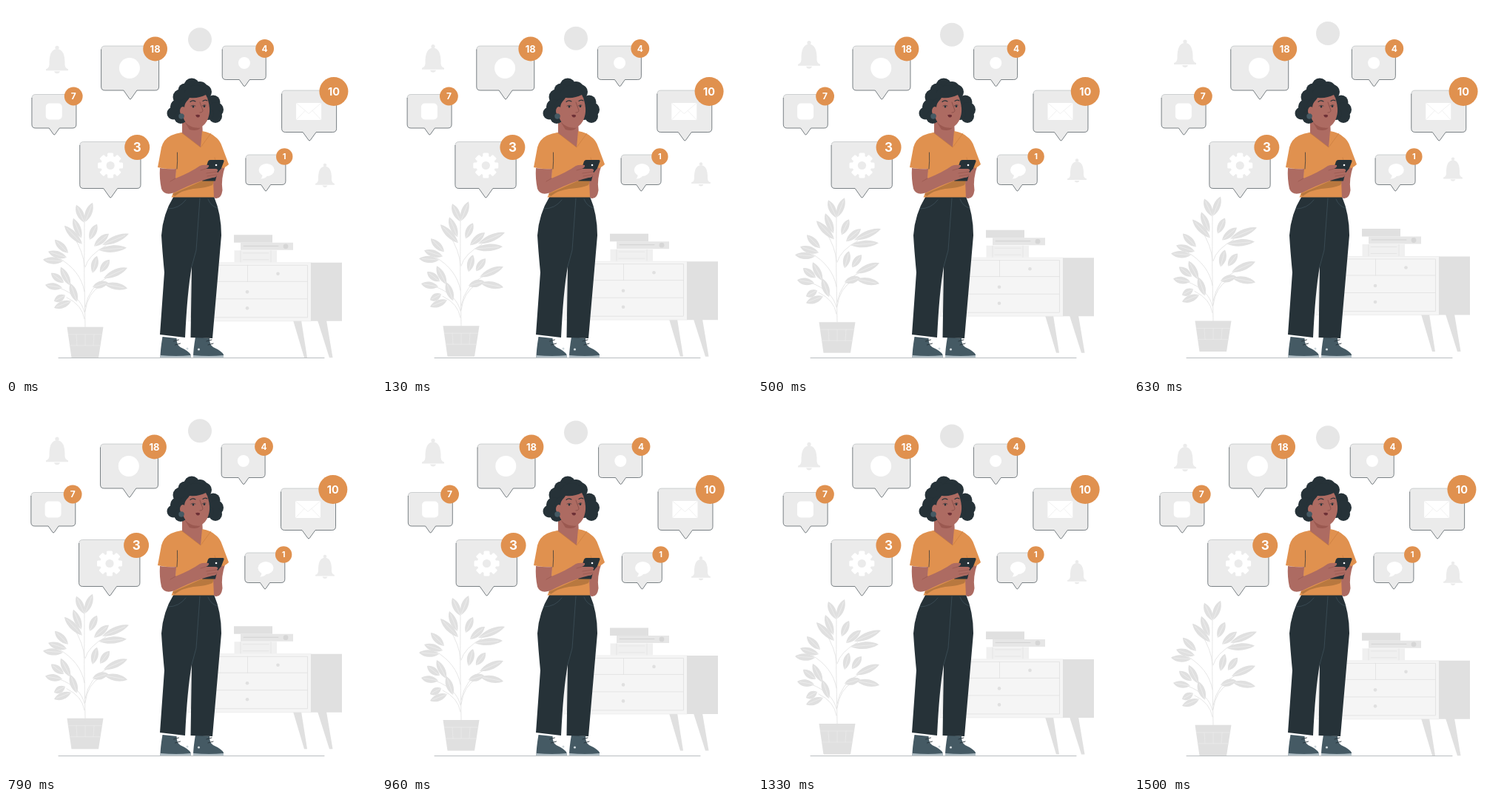
An HTML page with a canvas for the animation above (1.54 s loop, 500 by 500 pixels).

```html
<!DOCTYPE html>
<html lang="en">
<head>
<meta charset="utf-8">
<title>Notifications</title>
<style>
html, body { margin: 0; width: 100%; height: 100%; overflow: hidden; background: #fff; }
canvas { display: block; width: 100vw; height: 100vh; }
</style>
</head>
<body>
<canvas id="stage"></canvas>
<script>
const canvas = document.getElementById('stage');
const ctx = canvas.getContext('2d');
const ratio = window.devicePixelRatio || 1;
canvas.width = canvas.height = 500 * ratio;

const LOOP = 1540, STEPS = 37, CYCLE = 1500, LEAD = 12;
const DARK = '#263238', SLATE = '#455a64', ORANGE = '#e0914f', SKIN = '#ad6b62', SKIN_SHADE = '#9a5850';
const PALE = '#ebebeb', GREY = '#e0e0e0', LIGHT = '#f5f5f5', WHITE = '#fff';

function fill(d, color) {
  ctx.fillStyle = color;
  ctx.fill(new Path2D(d));
}
function line(d, color, width = 0.7) {
  ctx.strokeStyle = color;
  ctx.lineWidth = width;
  ctx.stroke(new Path2D(d));
}
function disc(x, y, r, color, ry = r) {
  ctx.fillStyle = color;
  ctx.beginPath();
  ctx.ellipse(x, y, r, ry, 0, 0, Math.PI * 2);
  ctx.fill();
}
function box(x, y, w, h, color, r = 0) {
  ctx.fillStyle = color;
  ctx.beginPath();
  ctx.roundRect(x, y, w, h, r);
  ctx.fill();
}
function shifted(x, y, scale, draw) {
  ctx.save();
  ctx.translate(x, y);
  ctx.scale(scale, scale);
  draw();
  ctx.restore();
}

// Icons, drawn around their own centre
const icons = {
  disc: () => disc(0, 0, 14, WHITE),
  smallDisc: () => disc(0, 0, 8, WHITE),
  square: () => box(-11, -11, 22, 22, WHITE, 5),
  gear() {
    for (let i = 0; i < 8; i++) {
      ctx.save();
      ctx.rotate(i * Math.PI / 4);
      box(-4, -17, 8, 10, WHITE, 1.5);
      ctx.restore();
    }
    disc(0, 0, 13, WHITE);
    disc(0, 0, 5.6, PALE);
  },
  mail() {
    box(-17, -11.5, 34, 23, WHITE);
    line('M-17 -11.5L0 3L17 -11.5M-17 11.5L-5 -1M17 11.5L5 -1', PALE, 0.7);
  },
  chat() {
    disc(0, -1, 10.5, WHITE, 8.6);
    fill('M-6 4Q-5 9 -8 11Q-2 11 1 7Z', WHITE);
  }
};

const bubbles = [
  { x: 128.7, y: 54, w: 78, h: 60, tip: 168, drop: 12.5, tail: 9, icon: 'disc', ix: 167, iy: 84, text: '18', bx: 201.7, by: 58, r: 16.4, size: 13 },
  { x: 35, y: 119.5, w: 60, h: 45.5, tip: 65.3, drop: 9.5, tail: 7, icon: 'square', ix: 64.8, iy: 142.5, text: '7', bx: 91.3, by: 122, r: 12.4, size: 12 },
  { x: 99.8, y: 183.5, w: 82.3, h: 63, tip: 141.3, drop: 13, tail: 9.5, icon: 'gear', ix: 141.2, iy: 215.5, text: '3', bx: 177.3, by: 191, r: 17, size: 17 },
  { x: 292.3, y: 54, w: 59, h: 45.5, tip: 322.3, drop: 9.5, tail: 7, icon: 'smallDisc', ix: 322, iy: 77, text: '4', bx: 349.7, by: 57.5, r: 12.4, size: 12 },
  { x: 372.7, y: 114, w: 74, h: 56.5, tip: 410.2, drop: 12, tail: 9, icon: 'mail', ix: 409.2, iy: 142.5, text: '10', bx: 443, by: 115.5, r: 19.5, size: 14.5 },
  { x: 324, y: 201, w: 54, h: 40.5, tip: 351.2, drop: 9, tail: 6.5, icon: 'chat', ix: 352.2, iy: 222.5, text: '1', bx: 376.3, by: 203.5, r: 11.2, size: 11 }
];

function bubble(b) {
  const right = b.x + b.w, bottom = b.y + b.h, c = 5;
  const top = `M${b.x} ${b.y + c}q0 ${-c} ${c} ${-c}H${right - c}q${c} 0 ${c} ${c}`;
  const lower = `V${bottom - c}q0 ${c} ${-c} ${c}H${b.tip + b.tail}L${b.tip + 1} ${bottom + b.drop - 1}q-1 1 -2 0L${b.tip - b.tail} ${bottom}H${b.x + c}q${-c} 0 ${-c} ${-c}`;
  fill(top + lower + 'Z', PALE);
  line(top, '#a3a8aa', 0.5);
  line(`M${right} ${b.y + c}${lower}V${b.y + c}`, DARK, 0.6);
  shifted(b.ix, b.iy, 1, icons[b.icon]);
  disc(b.bx, b.by, b.r, ORANGE);
  ctx.fillStyle = WHITE;
  ctx.font = `700 ${b.size}px Inter, sans-serif`;
  ctx.textAlign = 'center';
  ctx.fillText(b.text, b.bx, b.by + b.size * 0.36);
}

function bell() {
  disc(0, -16, 2.6, PALE);
  fill('M-10.5 7Q-11 -14 0 -14Q11 -14 10.5 7Q11 12 15 13V15H-15V13Q-11 12 -10.5 7Z', PALE);
  fill('M-4 16H4Q3 19 0 19Q-3 19 -4 16Z', PALE);
}

const leaves = [
  [106, 293, 95, 269], [107, 292, 117, 266], [102, 314, 91, 287], [103, 322, 79, 297],
  [113, 316, 123, 295], [119, 325, 139, 308], [130, 323, 166, 308], [125, 330, 163, 327],
  [84, 334, 66, 316], [82, 340, 57, 332], [77, 345, 50, 343], [87, 378, 74, 353],
  [78, 374, 61, 361], [76, 381, 53, 377], [96, 400, 87, 375], [88, 399, 65, 408],
  [80, 391, 65, 399], [117, 361, 123, 338], [127, 360, 140, 343], [132, 368, 164, 354],
  [133, 376, 164, 382], [117, 380, 138, 374]
];

function leaf([x, y, tipX, tipY]) {
  const len = Math.hypot(tipX - x, tipY - y);
  ctx.save();
  ctx.translate(x, y);
  ctx.rotate(Math.atan2(tipY - y, tipX - x));
  fill(`M0 0C${len * 0.3} -6.5 ${len * 0.75} -6.5 ${len} 0C${len * 0.7} 6 ${len * 0.3} 6 0 0Z`, GREY);
  line(`M1 0H${len * 0.85}`, LIGHT, 0.5);
  ctx.restore();
}

function plant() {
  line('M107 434Q105 360 106 289M106 352Q105 333 91 311M107 353Q111 337 135 324M106 386Q101 358 72 341M107 407Q112 379 137 367M106 414Q101 392 72 381M107 413Q110 388 128 378M106 423Q103 404 82 394', GREY, 0.8);
  leaves.forEach(leaf);
  fill('M82.5 434H131.5L125 475.5H88.5Z', GREY);
  line('M84 444H130M86 459H128M95 444L96 459M107 444V459M119 444L118 459', '#ececec', 0.6);
}

function furniture() {
  fill('M388 425H399L407 475.5H403Z', GREY);
  fill('M421 425H433L441.5 475.5H437Z', GREY);
  box(246, 347, 166, 79, LIGHT);
  line('M246 347H412M246 426H412', '#e6e6e6', 0.6);
  line('M250 350.5H407.5V421H250ZM250 372.5H407.5M250 396H407.5M326.5 350.5V372.5', GREY, 0.8);
  box(412, 347, 42, 79, GREY);
  for (const [x, y] of [[367.5, 362], [326, 386.5], [326, 408.5]]) disc(x, y, 2.3, GREY);
  box(308, 309.5, 52, 10.5, GREY);
  box(317, 320, 71, 10, '#e6e6e6');
  line('M321 324.5H368', '#d2d2d2', 1);
  disc(378, 325, 3.4, '#d6d6d6');
  box(308.5, 330.5, 57.5, 16, '#f0f0f0');
  line('M317 331V346M358 331V346M320 334H355M320 343H355', GREY);
}

function shoe(x, y) {
  shifted(x, y, 1, () => {
    fill('M3 -28L22 -26Q22 -17 27 -14Q38 -9 41 -4V0H0Q0 -10 3 -28Z', SLATE);
    fill('M0 -3Q22 -1 41 -3V0H0Z', '#b0bec5');
    line('M18 -22L25 -24M20 -17L27 -19', DARK, 0.9);
  });
}

function trousers() {
  fill('M226.5 257.5H281Q291 281 291 310L279 449L249.5 448L251 352Q245 385 242 448L208 444L214 360Q211 328 210 310Q212 281 226.5 257.5Z', DARK);
  line('M219 274Q234 274 243 262M262 260L257 330L251 352M273 261Q277 271 286 273', SLATE, 0.6);
}

function torso() {
  fill('M238 151V175L263 195L266 175L265 155Z', SKIN);
  fill('M241 156Q250 166 263 164.5Q258 170 248 167Z', SKIN_SHADE);
  fill('M287 218L297 214Q290 234 292.5 249Q291 261 283 260Q277 257 279 242L280 228Z', SKIN);
  fill('M237 171L263 191L265 169Q277 171 283 177Q289 181 292 190L301 214Q296 219 287 222L282 221L280 236L281 258.5H223.5Q230 246 229 220Q217 221 205 218L210 191Q213 180 223 175Q230 172 237 171Z', ORANGE);
  fill('M225 254L268 235L281 236L279 242Q270 246 253 247Q238 249 228 257Z', '#b8783f');
  line('M231.5 198Q232 210 231 220', DARK, 0.7);
  line('M237 171L263 191L277 172M282 205L287 222', '#c77b3d', 0.6);
}

function hands() {
  fill('M276 208H293Q295 208 294.5 210L285 235Q284 236.5 282 236.5H266Q264 236 265 234L273 210Q274 208 276 208Z', DARK);
  disc(284, 215, 1.3, WHITE);
  fill('M208 219Q220 221 230 220L229 233Q249 225 262 216Q266 214 274 215Q275 218 270 220L284 220Q288 221 285 224Q288 226 285 228Q285 232 279 232Q271 234 265 236Q245 243 228 252Q214 257 210 247Q207 233 208 219Z', SKIN);
  line('M270 220L263 222M285 224L271 226M284 228L272 230M229 233L222 237', SKIN_SHADE, 0.8);
  fill('M284 232Q285 224 293 218L293.5 223Q288 230 288 237L281 244Z', SKIN);
}

const curls = [
  [251, 108, 10.5], [242, 114, 9.5], [236, 123, 10.5], [232, 136, 10], [226, 145, 8.5], [236, 150, 9],
  [262, 113, 11], [268, 116, 10], [280, 130, 9.5], [284, 140, 10], [283, 149, 9], [256, 123, 16],
  [246, 137, 13], [273, 146, 8]
];

function head() {
  curls.forEach(([x, y, r]) => disc(x, y, r, DARK));
  fill('M241 139C241 130 245 129 248 124Q261 125 270 120Q274 127 275 138C276 151 269 164 260 164C250 165 242 158 240 152Z', SKIN);
  disc(239, 142, 4, SKIN, 6);
  disc(237, 149, 3.7, SLATE);
  line('M249 129.5Q252 126.5 256 129M266 128.5Q269 126 272 128', DARK, 1.1);
  disc(253, 136, 1.3, DARK, 1.6);
  disc(268, 135.5, 1.3, DARK, 1.6);
  line('M250 135Q253 133 256 135M265 135Q268 132.5 270 134', DARK, 0.6);
  line('M262 130Q264 136 266 141Q266 144 262 144', '#7d4742', 0.7);
  fill('M256 147.5Q259 146 262 147.5Q262 151 259 150.5Q257 150 256 147.5Z', '#6d3036');
}

function woman() {
  shoe(208.5, 475);
  shoe(253, 475);
  disc(245, 463, 1.5, '#cfd8dc');
  disc(260.5, 464, 1.6, '#cfd8dc');
  trousers();
  torso();
  hands();
  head();
}

// Sideways shake: one stop per tenth of the cycle
const shakeStops = [0, -1, 2, -4, 4, -4, 4, -4, 2, -1, 0];
function shake(p) {
  const i = Math.floor(p * 10), f = p * 10 - i;
  return shakeStops[i] + (shakeStops[i + 1] - shakeStops[i]) * f;
}
const float = p => -10 * (1 - Math.abs(2 * p - 1));

function draw(time) {
  const step = Math.floor((time % LOOP + 4) * STEPS / LOOP) % STEPS;
  const phase = (step * LOOP / STEPS + LEAD) % CYCLE / CYCLE;
  ctx.setTransform(ratio, 0, 0, ratio, 0, 0);
  ctx.fillStyle = WHITE;
  ctx.fillRect(0, 0, 500, 500);
  ctx.lineJoin = ctx.lineCap = 'round';

  shifted(0, float(phase), 1, () => {
    shifted(69, 72.5, 1, bell);
    shifted(431, 229, 0.86, bell);
    disc(262, 45.5, 16, '#e6e6e6');
    furniture();
    plant();
  });
  line('M71 475.6H430', '#a5aaad', 0.8);
  woman();
  shifted(shake(phase), 0, 1, () => bubbles.forEach(bubble));
}

const start = performance.now();
function tick() {
  draw(performance.now() - start);
  requestAnimationFrame(tick);
}
tick();
</script>
</body>
</html>
```
